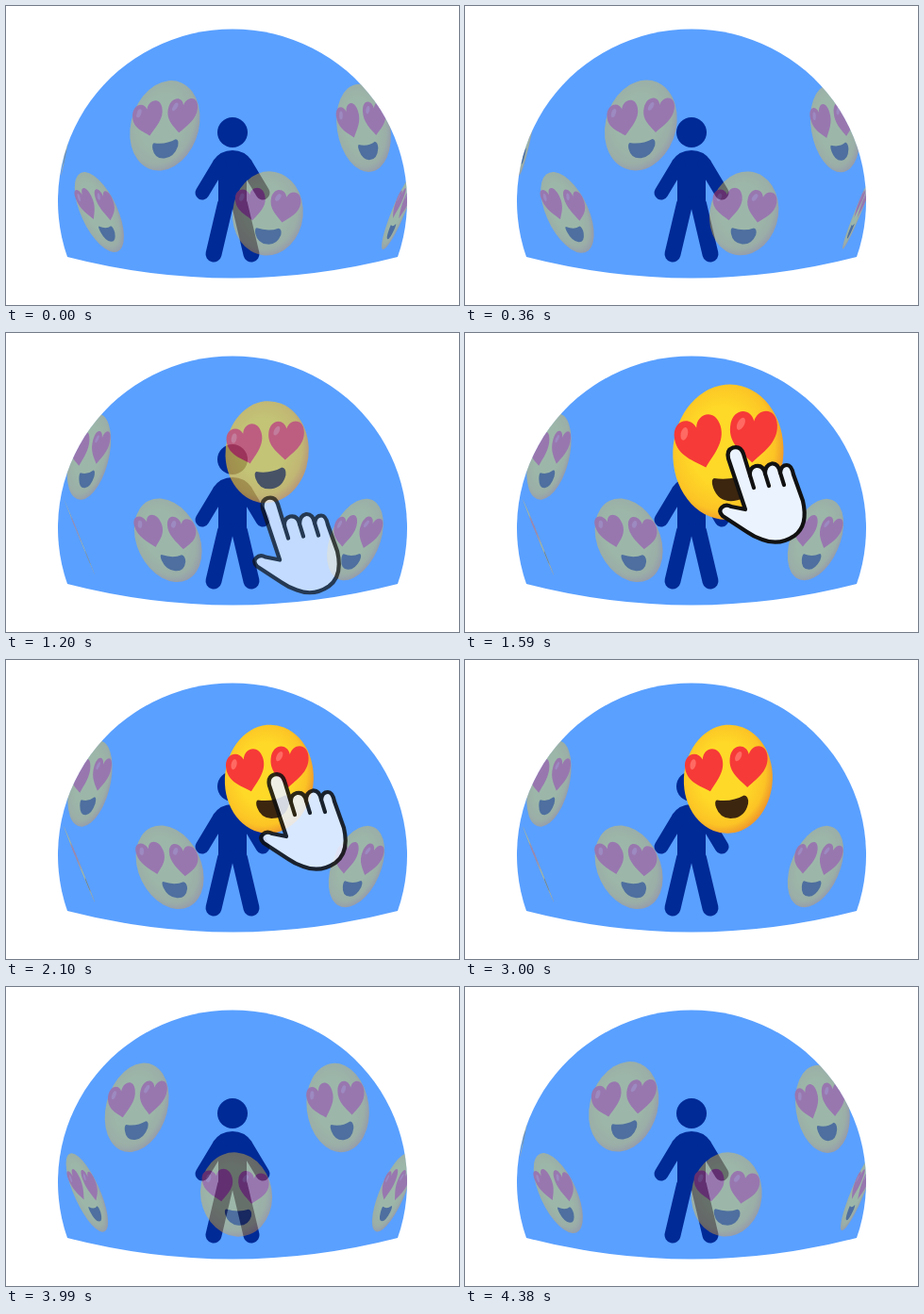
These frames come from a looping animation (480x317 px, 4410 ms). An HTML page:

```html
<!DOCTYPE html>
<html lang="en">
<head>
<meta charset="utf-8">
<title>Dome carousel</title>
<style>
  html, body { margin: 0; width: 100%; height: 100%; overflow: hidden; background: #fff; }
  svg { display: block; width: 100%; height: 100%; }
</style>
</head>
<body>
<svg viewBox="0 0 480 317">
  <defs>
    <path id="dome" d="M65 266A185 182.400 0 1 1 415 266Q240 311 65 266Z"/>
    <clipPath id="inside"><use href="#dome"/></clipPath>
    <radialGradient id="skin" cx=".45" cy=".45" r=".57">
      <stop offset=".5" stop-color="#ffd928"/>
      <stop offset=".83" stop-color="#fcc425"/>
      <stop offset="1" stop-color="#ee962c"/>
    </radialGradient>
    <g id="heart">
      <path fill="#f63a38" d="M0 24C-8 16-21 8-20-7C-19-23-3-23 0-11C3-23 19-23 20-7C21 8 8 16 0 24Z"/>
      <ellipse cx="-11" cy="-9" rx="3" ry="5.500" transform="rotate(25 -11 -9)" fill="#ff6a63"/>
    </g>
    <g id="face">
      <ellipse rx="47" ry="57.5" fill="url(#skin)"/>
      <use href="#heart" transform="translate(-24 -12.500) rotate(-11)"/>
      <use href="#heart" transform="translate(22 -13) rotate(5)"/>
      <path fill="#3c260f" d="M-13 21Q3 25 16 19Q21 20 20 28Q16 42 3 42Q-10 42-14 29Q-16 22-13 21Z"/>
    </g>
  </defs>

  <use href="#dome" fill="#5aa0ff"/>

  <g fill="#002a96" stroke="#002a96" stroke-linecap="round">
    <circle cx="240" cy="134" r="16" stroke="none"/>
    <path stroke="none" d="M219.500 164Q227 153 240 153Q253 153 260.500 164L255 174V214H225V174Z"/>
    <path stroke-width="15" d="M208 198L226 168M272 198L254 168"/>
    <path stroke-width="17" d="M220 263L232.500 210M260 263L247.500 210"/>
  </g>

  <g id="faces" clip-path="url(#inside)"></g>

  <g id="hand" stroke="#111" stroke-width="4.200" stroke-linecap="round" stroke-linejoin="round">
    <path fill="#ebf3ff" d="M297 187L279 133Q277 124 284 121.500Q292 119.500 295 128L302 151Q301 143 308 141Q316 139.500 318 149
      Q318 140 325 138.500Q332 138 334 148Q335 140 341 140Q346 140 348 150L358 178Q364 204 349 215Q333 226 315 219
      Q306 216 299 211L273 194Q268 189 272 185Q276 181 282 184Z"/>
    <path fill="none" d="M302 151L306 164M318 149L322 162M334 148L338 161"/>
  </g>
</svg>

<script>
const LOOP = 4410, COUNT = 5, STEP = 360 / COUNT;
const rows = [
  { radius: 181, angle: 12.3, y: 126, drop: 10, sx: .85, sy: .835, tilt: -.1, lean: .2 },
  { radius: 170, angle: -23.4, y: 220, drop: -3, sx: .81, sy: .775, tilt: .08, lean: -.41 }
];

const faceLayer = document.getElementById('faces');
const hand = document.getElementById('hand');
const clamp = u => Math.min(1, Math.max(0, u));
const ramp = (t, from, to) => clamp((t - from) / (to - from));
const ease = (t, from, to) => (1 - Math.cos(Math.PI * ramp(t, from, to))) / 2;

const faces = rows.flatMap((row, r) => Array.from({ length: COUNT }, (_, i) => {
  const node = document.createElementNS('http://www.w3.org/2000/svg', 'use');
  node.setAttribute('href', '#face');
  faceLayer.append(node);
  return { node, row, offset: i * STEP, selectable: r === 0 && i === 0 };
}));

function placeFace({ node, row, offset, selectable }, turn, selected, pulse) {
  const a = (row.angle + offset + turn) * Math.PI / 180;
  const sin = Math.sin(a), cos = Math.cos(a);
  const width = (cos + .12) / 1.12;
  node.style.display = width > 0 ? '' : 'none';
  if (width <= 0) return;

  const pick = selectable ? selected : 0;
  const far = 1 / (1 + .1 * (1 - cos));
  const grow = selectable ? 1 + pulse : 1;
  const sx = (row.sx + (1.02 - row.sx) * pick) * width * grow;
  const sy = (row.sy + (1 - row.sy) * pick) * far * grow;
  const x = 240 + row.radius * sin + 7 * sin * sin;
  const y = row.y + row.drop * (1 - cos);
  const matrix = [sx, row.tilt * sx, row.lean * sin * sy, sy, x, y];
  node.setAttribute('transform', `matrix(${matrix})`);
  node.setAttribute('opacity', .4 + .6 * pick ** 2);
}

function draw(t) {
  const turn = 36 * (ease(t, 0, 1320) - 1 + ease(t, 3300, LOOP));
  const selected = ease(t, 1050, 1310) - ease(t, 3420, 3780);
  const pulse = .27 * Math.sin(Math.PI * ramp(t, 1470, 1800));
  faces.forEach(face => placeFace(face, turn, selected, pulse));

  const below = 1 - ease(t, 1050, 1470);
  hand.setAttribute('transform', `translate(${-9.7 * below} ${75 * below})`);
  hand.setAttribute('opacity', ramp(t, 1050, 1260) - ramp(t, 2075, 2285));
}

const start = performance.now();
function tick() {
  draw((performance.now() - start) % LOOP);
  requestAnimationFrame(tick);
}
tick();
</script>
</body>
</html>
```
